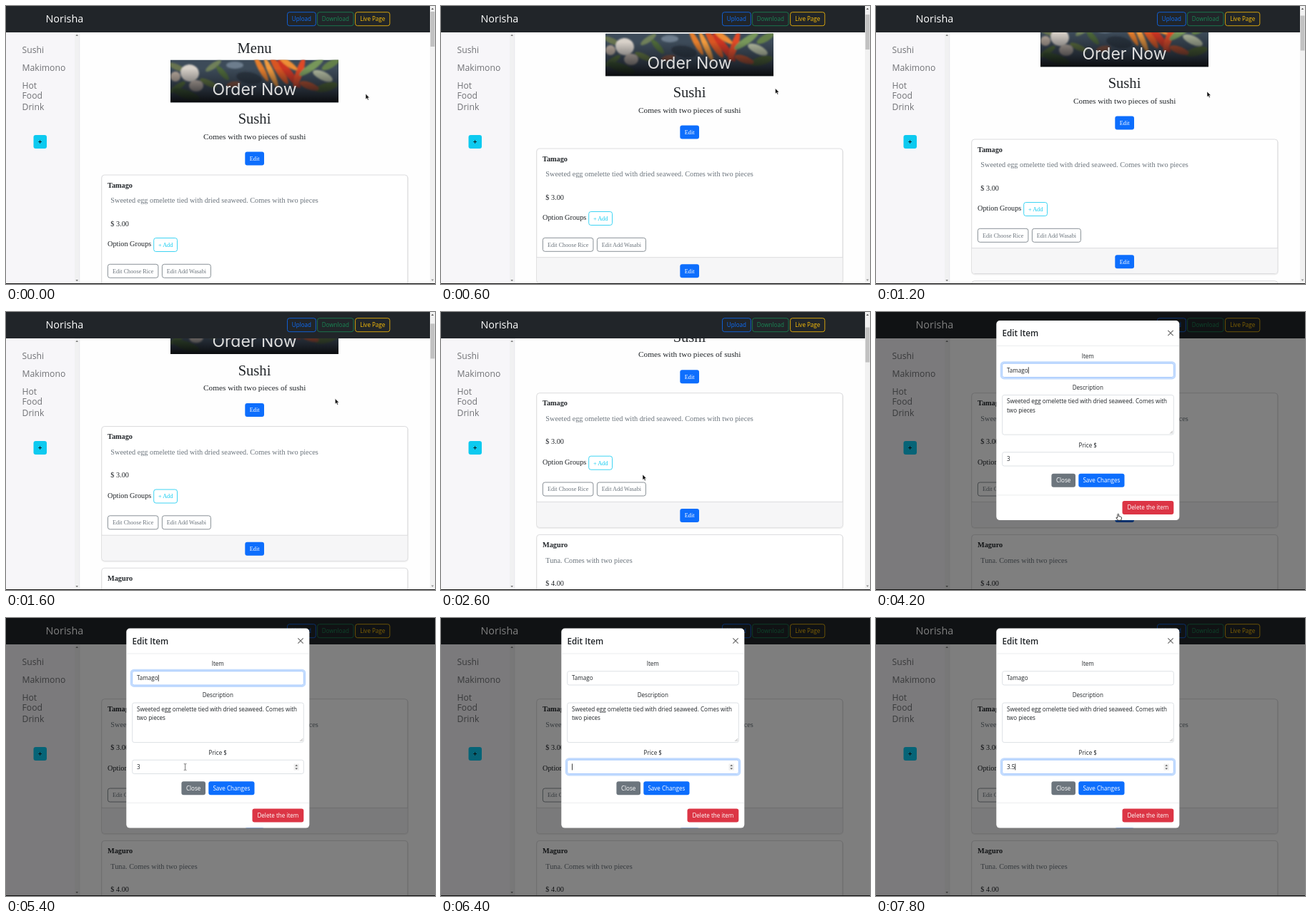
Recreate the animation shown at these times as an HTML page. Size 600 by 390 pixels, loop 8000 ms.

```html
<!DOCTYPE html>
<html lang="en">
<head>
<meta charset="utf-8">
<title>Menu editor</title>
<style>
  html, body { margin: 0; width: 100%; height: 100%; overflow: hidden; background: #fefefe; }
  svg { display: block; width: 600px; height: 390px; }
  text { white-space: pre; }
  .serif { font-family: "Liberation Serif", "Times New Roman", serif; }
  .sans { font-family: "Open Sans", "Noto Sans", sans-serif; }
  .banner { font-family: Inter, Roboto, sans-serif; }
</style>
</head>
<body>
<svg id="stage" viewBox="0 0 600 390" xmlns="http://www.w3.org/2000/svg"></svg>
<script>
const LOOP = 8000, STEP = 200;
const BLUE = '#0d6efd', GRAY = '#6c757d', CYAN = '#0dcaf0', INK = '#212529';

// Markup helpers
const text = (x, y, str, size, fill = INK, font = 'serif', extra = '') =>
  `<text class="${font}" x="${x}" y="${y}" font-size="${size}" fill="${fill}" ${extra}>${str}</text>`;
const mid = (x, y, str, size, fill, font, extra = '') =>
  text(x, y, str, size, fill, font, 'text-anchor="middle" ' + extra);
const box = (x, y, w, h, fill, r = 0, extra = '') =>
  `<rect x="${x}" y="${y}" width="${w}" height="${h}" rx="${r}" fill="${fill}" ${extra}/>`;
const path = (d, fill, extra = '') => `<path d="${d}" fill="${fill}" ${extra}/>`;
const line = (d, color, w = 1) => path(d, 'none', `stroke="${color}" stroke-width="${w}"`);
const group = (id, body, extra = '') => `<g id="${id}" ${extra}>${body}</g>`;

const solid = (x, y, w, label, fill, font = 'sans', size = 8.1, id = '') =>
  box(x, y, w, 19, fill, 3, id && `id="${id}"`) + mid(x + w / 2, y + 12.4, label, size, '#fff', font);
const outline = (x, y, w, label, color, font = 'serif', size = 8.22) =>
  box(x, y, w, 19, 'none', 3, `stroke="${color}" stroke-width=".8"`) +
  mid(x + w / 2, y + 12.4, label, size, color, font);
const field = (y, h, id = '') =>
  (id && box(175, y - 1.6, 243, h + 3.2, 'none', 4, `id="${id}Ring" stroke="#c2dbfe" stroke-width="2.6"`)) +
  box(176.7, y, 239.6, h, '#fff', 2.6, `${id && `id="${id}Box"`} stroke="#ced4da" stroke-width=".7"`);

// Page parts
function photo() {
  const leaf = (x, y, a, c, rx = 13, ry = 4) =>
    `<ellipse rx="${rx}" ry="${ry}" fill="${c}" transform="translate(${x} ${y}) rotate(${a})"/>`;
  const shapes = [
    [239, 86, 25, '#67734f'], [240, 114, -35, '#557036'], [252, 124, 20, '#41612b', 20, 6],
    [290, 84, -35, '#70805a'], [303, 94, 50, '#4d6837'], [283, 108, 25, '#64773e'],
    [257, 94, 15, '#d8d1c9', 13, 12], [266, 112, 0, '#c7b9ad', 10, 8], [237, 99, 0, '#b9aa9d', 7, 7],
    [320, 83, 0, '#6d7d8d', 12, 5], [340, 101, 10, '#2b3541', 18, 8], [318, 110, -10, '#8b523d', 10, 4],
    [357, 88, 62, '#e57d2c', 20, 4], [371, 94, 66, '#f19a3c', 23, 4], [382, 90, 58, '#d95424', 23, 5],
    [396, 95, 52, '#cd3524', 25, 5], [410, 94, 108, '#df4a27', 22, 5], [395, 81, 35, '#ed8d35', 15, 4],
    [427, 86, -35, '#77975a', 20, 5], [443, 98, 25, '#aeb69b', 15, 6], [454, 82, -30, '#637f49', 14, 5],
    [448, 114, -15, '#4e652f', 16, 6], [424, 112, 20, '#bd502a', 14, 5]
  ];
  return `<g clip-path="url(#photoClip)">` + box(230, 75.5, 235, 60, '#3d4b59') +
    `<g filter="url(#soft)">${shapes.map(s => leaf(...s)).join('')}</g>` +
    box(230, 75.5, 235, 60, 'url(#shade)') + '</g>' +
    mid(347.5, 125, 'Order Now', 23, '#dedede', 'banner');
}

const card = (y, h) =>
  box(134, y + 1, 428, h, 'none', 4, 'stroke="#000" stroke-opacity=".06" stroke-width="2"') +
  box(133.8, y, 428, h, '#fff', 4, 'stroke="#d9d9db" stroke-width=".9"');

function content() {
  return mid(347.5, 66, 'Menu', 20.57) + photo() +
    mid(347.5, 165, 'Sushi', 20.57) +
    mid(347.7, 186.8, 'Comes with two pieces of sushi', 11.31) +
    solid(334.3, 204.5, 26.7, 'Edit', BLUE, 'serif', 8.22) +
    card(237, 188.5) +
    text(142, 254.5, 'Tamago', 10.28, INK, 'serif', 'font-weight="700"') +
    text(146.3, 276.4, 'Sweeted egg omelette tied with dried seaweed. Comes with two pieces', 10.28, GRAY) +
    text(146.3, 308.5, '$ 3.00', 10.28) +
    text(142, 337.3, 'Option Groups', 10.28) +
    outline(206.7, 325.5, 32.8, '+ Add', CYAN) +
    outline(142.4, 362.3, 70.5, 'Edit Choose Rice', GRAY) +
    outline(218.4, 362.3, 68, 'Edit Add Wasabi', GRAY) +
    path('M134.3 389.7H561.3V421.5Q561.3 425 557.8 425H137.8Q134.3 425 134.3 421.5Z', '#f6f6f7') +
    line('M134 389.7H562', '#d9d9db', .9) +
    solid(334.3, 399.3, 26.7, 'Edit', BLUE, 'serif', 8.22, 'itemEdit') +
    card(435.7, 190) +
    text(142, 453.4, 'Maguro', 10.28, INK, 'serif', 'font-weight="700"') +
    text(146.3, 475.4, 'Tuna. Comes with two pieces', 10.28, GRAY) +
    text(146.3, 507.5, '$ 4.00', 10.28);
}

function sidebar() {
  const links = [['Sushi', 66], ['Makimono', 91], ['Hot', 116], ['Food', 129.5], ['Drink', 146]];
  return box(0, 37, 103, 353, '#f7f6f9') + box(96, 37, 6.5, 353, '#f1f1f2') +
    line('M102.8 37V390', '#e4e4e7', .8) +
    path('M97.4 42L99.2 39.8L101 42Z', '#777') + path('M97.4 384L99.2 386.2L101 384Z', '#777') +
    links.map(([s, y]) => text(22.5, y, s, 12.2, '#717276', 'sans')).join('') +
    box(38.5, 181, 18.5, 19, CYAN, 3) + line('M45.2 190.5H50M47.6 188.1V192.9', '#111', .9);
}

function header() {
  return box(0, 0, 600, 37, INK) + text(55.5, 23.3, 'Norisha', 14.4, '#fff', 'sans') +
    outline(393.5, 8.7, 39.8, 'Upload', BLUE, 'sans', 8.05) +
    outline(435.6, 8.7, 50.4, 'Download', '#198754', 'sans', 8.05) +
    outline(488.6, 8.7, 48.2, 'Live Page', '#ffc107', 'sans', 8.05);
}

function scrollbar() {
  return box(593, 0, 7, 389, '#f1f1f1') + box(593.6, 8, 5.8, 49, '#c1c1c1', 0, 'id="thumb"') +
    path('M594.7 5L596.5 2.8L598.3 5Z', '#555') + path('M594.7 383.5L596.5 385.7L598.3 383.5Z', '#888');
}

function modal() {
  return box(168.3, 14.6, 256, 280, '#fff', 5) +
    text(176.5, 36.6, 'Edit Item', 11.7, INK, 'sans', 'font-weight="600"') +
    line('M408.3 28.3L415.7 35.7M415.7 28.3L408.3 35.7', '#666', 1.1) +
    line('M168.5 50H424M168.5 259.4H424', '#e3e6e9', .7) +
    mid(296.3, 67.2, 'Item', 8.1, INK, 'sans') + field(74.7, 19.3, 'item') +
    text(183, 87.2, 'Tamago', 8.1, INK, 'sans') +
    mid(296.3, 111.3, 'Description', 8.1, INK, 'sans') + field(119, 55.6) +
    text(183, 130.8, 'Sweeted egg omelette tied with dried seaweed. Comes with', 8.1, INK, 'sans') +
    text(183, 143.2, 'two pieces', 8.1, INK, 'sans') +
    line('M411.3 173L415 169.3M413.4 173L415 171.4', '#777', .6) +
    mid(296.3, 192.2, 'Price $', 8.1, INK, 'sans') + field(199.2, 19.3, 'price') +
    text(183, 211.9, '3', 8.1, INK, 'sans', 'id="price"') +
    group('spinner', box(402.5, 204.5, 7.5, 9.2, '#efefef') +
      path('M404.4 207.8L406.2 205.7L408 207.8Z', '#555') + path('M404.4 210.4L406.2 212.5L408 210.4Z', '#555')) +
    box(0, 0, .8, 9, '#111', 0, 'id="caret"') +
    solid(245.4, 229.2, 33.6, 'Close', GRAY) + solid(283.3, 229.2, 64.2, 'Save Changes', BLUE) +
    solid(344.5, 267.4, 71.8, 'Delete the item', '#dc3545');
}

const pointers =
  group('arrow', path('M0 0V7.6L1.8 6L3 8.7L4.3 8.1L3.1 5.5H5.4Z', '#111', 'stroke="#fff" stroke-width=".5"')) +
  group('hand', path('M-.9 .8Q0 -.6 .9 .8V3.6L4 4.3Q5 4.7 4.8 6L4 9.3H-.2L-2.8 5.9Q-2.7 4.8 -1.6 5.2L-.9 5.8Z',
    '#fff', 'stroke="#111" stroke-width=".8"')) +
  group('beam', line('M-1.8 -4.4H-.5L0 -4L.5 -4.4H1.8M0 -4V4M-1.8 4.4H-.5L0 4L.5 4.4H1.8', '#555', .8));

document.getElementById('stage').innerHTML = `
  <defs>
    <clipPath id="photoClip"><rect x="230" y="75.5" width="235" height="60"/></clipPath>
    <filter id="soft"><feGaussianBlur stdDeviation=".9"/></filter>
    <linearGradient id="shade" x1="0" y1="0" x2="0" y2="1">
      <stop offset=".2" stop-color="#11141a" stop-opacity="0"/>
      <stop offset=".7" stop-color="#11141a" stop-opacity=".62"/>
      <stop offset="1" stop-color="#08090b" stop-opacity=".96"/>
    </linearGradient>
  </defs>` +
  box(0, 0, 600, 390, '#fefefe') + group('content', content()) + sidebar() + header() +
  group('scrollbar', scrollbar()) +
  group('dialog', box(0, 0, 600, 390, '#000', 0, 'opacity=".5"') + group('modal', modal())) +
  box(0, 389, 600, 1, '#111') + pointers;

// Timelines: [start ms, value...], each value holds until the next row
const SCROLL = [[0, 0], [400, 14], [600, 37], [800, 43], [1200, 50], [1400, 63],
  [1600, 76.5], [1800, 93], [2000, 112], [2200, 123.3]];
const POINTER = [[0, 503, 123.3, 'arrow'], [200, 496, 121, 'arrow'], [400, 480, 117, 'arrow'],
  [600, 467.5, 115.5, 'arrow'], [800, 465, 118, 'arrow'], [1200, 463, 120, 'arrow'],
  [1600, 460.3, 121.5, 'arrow'], [1800, 452, 119, 'arrow'], [2000, 410, 110, 'arrow'],
  [2200, 350, 101, 'arrow'], [2400, 308, 155, 'arrow'], [2600, 282, 228, 'arrow'],
  [2800, 290, 285, 'arrow'], [3200, 300, 285, 'arrow'], [3400, 313, 284, 'arrow'],
  [3600, 326, 283, 'arrow'], [3800, 338.5, 282.2, 'hand'], [4200, 338.7, 283, 'hand'],
  [4400, 325, 271, 'arrow'], [4600, 300, 251, 'arrow'], [4800, 272, 226, 'arrow'],
  [5000, 256, 212, 'beam'], [5200, 251, 209, 'beam'], [5400, 250.6, 209, 'beam'], [6400, 0, 0, '']];
const PRICE = [[0, '3'], [6400, ''], [7200, '3'], [7600, '3.'], [7800, '3.5']];
const CARET = [[0, ''], [4200, 'item'], [4800, ''], [5200, 'item'], [5600, ''], [5800, 'price'],
  [6200, ''], [6400, 'price'], [6800, ''], [7200, 'price']];
const ITEM_FOCUS = [[0, 1], [5600, .5], [5800, 0]];
const PRICE_FOCUS = [[0, 0], [5600, .5], [5800, 1]];

const at = (rows, t) => rows.filter(r => r[0] <= t).pop().slice(1);
const $ = id => document.getElementById(id);
const set = (id, name, value) => $(id).setAttribute(name, value);
const show = (id, on) => { $(id).style.display = on ? '' : 'none'; };

function focusField(id, level) {
  set(id + 'Ring', 'opacity', level);
  set(id + 'Box', 'stroke', level > .4 ? '#86b7fe' : '#ced4da');
}

function draw(t) {
  const [scroll] = at(SCROLL, t), [x, y, shape] = at(POINTER, t);
  const open = t >= 4200, [caret] = at(CARET, t);
  set('content', 'transform', `translate(0 ${-scroll})`);
  set('thumb', 'y', 8 + scroll * .11);
  set('itemEdit', 'fill', shape === 'hand' ? '#0b5ed7' : BLUE);
  show('scrollbar', !open);
  show('dialog', open);
  set('modal', 'transform', `translate(0 ${t < 4400 ? -2.5 : 0})`);
  focusField('item', at(ITEM_FOCUS, t)[0]);
  focusField('price', at(PRICE_FOCUS, t)[0]);
  $('price').textContent = at(PRICE, t)[0];
  show('spinner', t >= 5000);
  show('caret', caret);
  if (open && caret) {
    const end = caret === 'item' ? 212.8 : 183 + $('price').getComputedTextLength();
    set('caret', 'x', end);
    set('caret', 'y', caret === 'item' ? 79.8 : 204.4);
  }
  for (const id of ['arrow', 'hand', 'beam']) show(id, id === shape);
  if (shape) set(shape, 'transform', `translate(${x} ${y})`);
}

const start = performance.now();
function tick() {
  const t = (performance.now() - start) % LOOP;
  draw(Math.floor(t / STEP) * STEP);
  requestAnimationFrame(tick);
}
tick();
</script>
</body>
</html>
```
